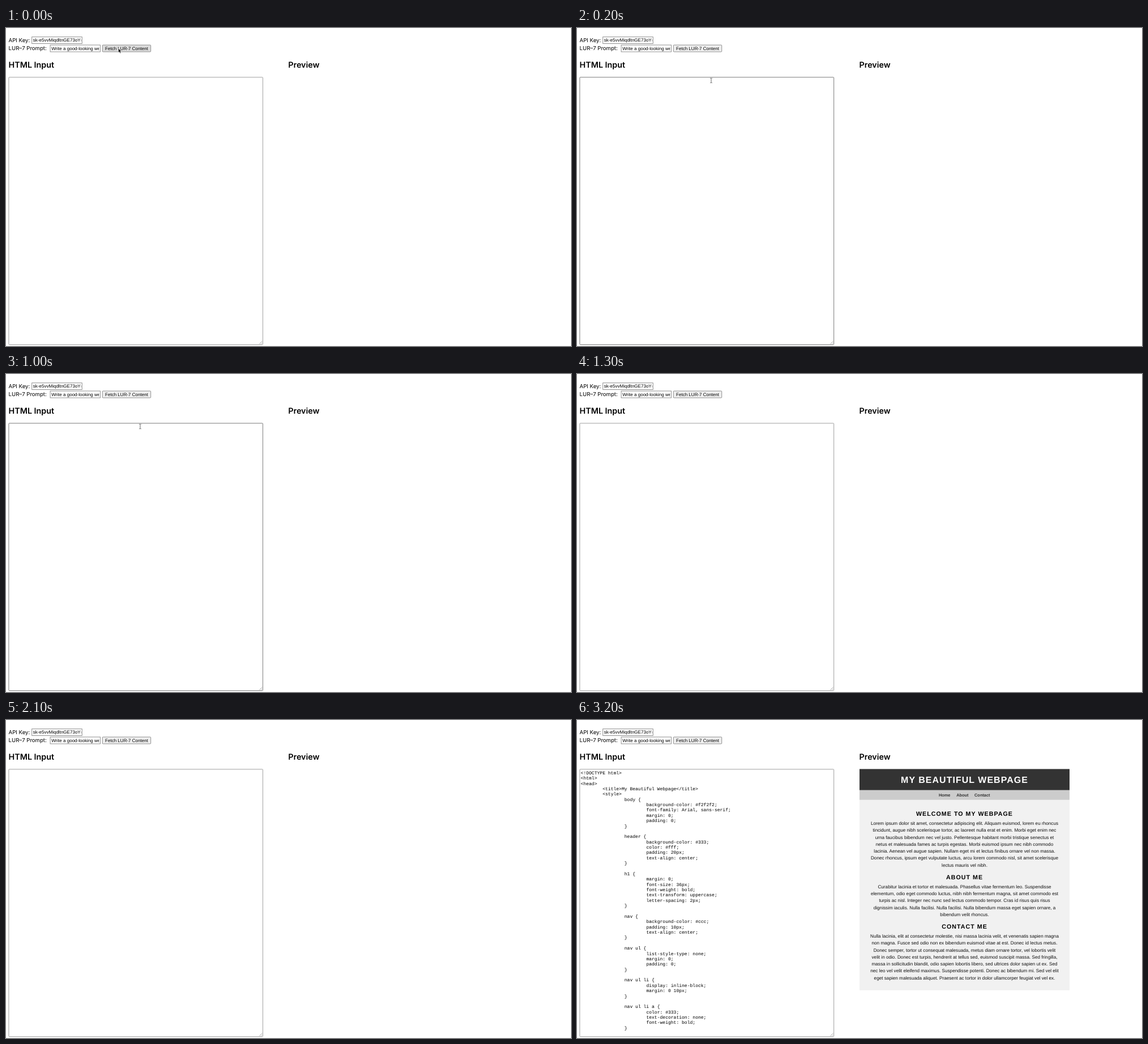
Write an HTML page that moves like this. It is 998 px wide and 561 px high and loops after 6350 ms.

```html
<!DOCTYPE html>
<html lang="en">
<head>
<meta charset="utf-8">
<title>HTML generator demo</title>
<style>
html, body { margin: 0; width: 100%; height: 100%; overflow: hidden; background: #fff; }
svg { display: block; width: 998px; height: 561px; }
text { white-space: pre; text-rendering: geometricPrecision; fill: #000; }
.label { font: 9.6px Inter, "Noto Sans CJK SC", sans-serif; }
.title { font: 600 14.3px Inter, "Noto Sans CJK SC", sans-serif; }
.field { font: 8.04px "Liberation Sans", Arial, sans-serif; }
.code { font: 8.04px "Liberation Mono", "Courier New", monospace; }
.h1, .h2, .nav, .para { font-family: "Liberation Sans", Arial, sans-serif; text-anchor: middle; }
.h1 { font-size: 16px; font-weight: bold; letter-spacing: 1.02px; fill: #fff; }
.h2 { font-size: 10.7px; font-weight: bold; letter-spacing: 1.02px; }
.nav { font-size: 7.4px; font-weight: bold; fill: #333; }
.para { font-size: 8.18px; fill: #111; }
.box { fill: #fff; stroke: #858585; }
</style>
</head>
<body>
<svg viewBox="0 0 998 561">
  <defs>
    <clipPath id="keyClip"><rect x="47" y="16" width="85.5" height="12"/></clipPath>
    <clipPath id="promptClip"><rect x="79" y="30" width="85.5" height="12"/></clipPath>
  </defs>
  <text class="label" x="4.6" y="24.5">API Key:</text>
  <rect class="box" x="45.7" y="15.7" width="88.6" height="11.8" stroke-width=".9"/>
  <g clip-path="url(#keyClip)"><text class="field" x="47.8" y="24.3">sk-e5vvMiqdltnGE73oYc</text></g>
  <text class="label" x="4.6" y="39">LUR–7 Prompt:</text>
  <rect class="box" x="78.1" y="30" width="88.4" height="12" stroke-width=".9"/>
  <g clip-path="url(#promptClip)"><text class="field" x="80.2" y="38.6">Write a good-looking webpage</text></g>
  <rect id="button" class="box" x="170.3" y="30" width="85.4" height="12" rx="1" stroke-width=".9"/>
  <text class="field" x="213" y="38.6" text-anchor="middle">Fetch LUR-7 Content</text>
  <text class="title" x="4.6" y="70">HTML Input</text>
  <text class="title" x="498.6" y="70">Preview</text>
  <rect id="area" class="box" x="4.9" y="86.9" width="448.8" height="471.7" rx="1" stroke-width=".9"/>
  <path d="M447.5 557.5l5-5M450.5 557.5l2-2" stroke="#888" stroke-width=".7"/>
  <g id="result">
    <rect x="499" y="86.5" width="371" height="390.3" fill="#f1f1f1"/>
    <rect x="499" y="86.5" width="371" height="37.3" fill="#333"/>
    <rect x="499" y="123.8" width="371" height="17" fill="#ccc"/>
  </g>
  <path id="arrow" d="M0 0v7.5l1.7-1.5 1.2 2.7 1.4-.6-1.2-2.6h2.3z" stroke="#fff" stroke-width=".6"/>
  <path id="beam" d="M-1.8-4.2q1.5 0 1.8.8 .3-.8 1.8-.8M0-3.4v6.8M-1.8 4.2q1.5 0 1.8-.8 .3.8 1.8.8" fill="none" stroke="#444" stroke-width=".8"/>
</svg>
<script>
const LOOP = 6350;
const $ = id => document.getElementById(id);

function addText(kind, x, y, content) {
  const node = document.createElementNS("http://www.w3.org/2000/svg", "text");
  node.setAttribute("class", kind);
  node.setAttribute("x", x);
  node.setAttribute("y", y);
  node.textContent = content;
  $("result").append(node);
}

// Generated markup: each entry is a [tab depth, line] pair
const rules = [
  ["body", "background-color: #f2f2f2", "font-family: Arial, sans-serif", "margin: 0", "padding: 0"],
  ["header", "background-color: #333", "color: #fff", "padding: 20px", "text-align: center"],
  ["h1", "margin: 0", "font-size: 36px", "font-weight: bold", "text-transform: uppercase", "letter-spacing: 2px"],
  ["nav", "background-color: #ccc", "padding: 10px", "text-align: center"],
  ["nav ul", "list-style-type: none", "margin: 0", "padding: 0"],
  ["nav ul li", "display: inline-block", "margin: 0 10px"],
  ["nav ul li a", "color: #333", "text-decoration: none", "font-weight: bold"]
];
const source = [
  [0, "<!DOCTYPE html>"], [0, "<html>"], [0, "<head>"],
  [1, "<title>My Beautiful Webpage</title>"], [1, "<style>"],
  ...rules.flatMap(([selector, ...body]) => [
    [2, selector + " {"], ...body.map(line => [3, line + ";"]), [2, "}"], [0, ""]
  ])
];
source.forEach(([depth, line], i) => addText("code", 6.6 + depth * 38.6, 95.8 + i * 9.375, line));

// Rendered page
const CENTER = 684.5;
addText("h1", CENTER, 110.8, "MY BEAUTIFUL WEBPAGE");
addText("nav", 649.2, 134.6, "Home");
addText("nav", 680.8, 134.6, "About");
addText("nav", 715.8, 134.6, "Contact");

function addSection(y, heading, body) {
  addText("h2", CENTER, y, heading);
  body.trim().split("\n").forEach((line, i) => addText("para", CENTER, y + 16 + i * 12.25, line.trim()));
}
addSection(169, "WELCOME TO MY WEBPAGE", `
  Lorem ipsum dolor sit amet, consectetur adipiscing elit. Aliquam euismod, lorem eu rhoncus
  tincidunt, augue nibh scelerisque tortor, ac laoreet nulla erat et enim. Morbi eget enim nec
  urna faucibus bibendum nec vel justo. Pellentesque habitant morbi tristique senectus et
  netus et malesuada fames ac turpis egestas. Morbi euismod ipsum nec nibh commodo
  lacinia. Aenean vel augue sapien. Nullam eget mi et lectus finibus ornare vel non massa.
  Donec rhoncus, ipsum eget vulputate luctus, arcu lorem commodo nisl, sit amet scelerisque
  lectus mauris vel nibh.`);
addSection(280.9, "ABOUT ME", `
  Curabitur lacinia et tortor et malesuada. Phasellus vitae fermentum leo. Suspendisse
  elementum, odio eget commodo luctus, nibh nibh fermentum magna, sit amet commodo est
  turpis ac nisl. Integer nec nunc sed lectus commodo tempor. Cras id risus quis risus
  dignissim iaculis. Nulla facilisi. Nulla facilisi. Nulla bibendum massa eget sapien ornare, a
  bibendum velit rhoncus.`);
addSection(368.2, "CONTACT ME", `
  Nulla lacinia, elit at consectetur molestie, nisi massa lacinia velit, et venenatis sapien magna
  non magna. Fusce sed odio non ex bibendum euismod vitae at est. Donec id lectus metus.
  Donec semper, tortor ut consequat malesuada, metus diam ornare tortor, vel lobortis velit
  velit in odio. Donec est turpis, hendrerit at tellus sed, euismod suscipit massa. Sed fringilla,
  massa in sollicitudin blandit, odio sapien lobortis libero, sed ultrices dolor sapien ut ex. Sed
  nec leo vel velit eleifend maximus. Suspendisse potenti. Donec ac bibendum mi. Sed vel elit
  eget sapien malesuada aliquet. Praesent ac tortor in dolor ullamcorper feugiat vel vel ex.`);

// Pointer steps: start time, shape, x, y
const pointer = [
  [0, "arrow", 198.6, 36],
  [100, "arrow", 222, 68],
  [200, "beam", 237, 92.6],
  [1100, "arrow", 238, 60],
  [1200, "arrow", 240, 20],
  [1300, "none", 0, 0]
];

function show(node, on) {
  node.style.visibility = on ? "visible" : "hidden";
}

function draw(now) {
  const t = now % LOOP;
  const [, shape, x, y] = pointer.findLast(step => step[0] <= t);
  for (const name of ["arrow", "beam"]) {
    show($(name), shape === name);
    $(name).setAttribute("transform", `translate(${x} ${y})`);
  }
  $("button").style.fill = t < 100 ? "#dcdcdc" : "#efefef";
  $("area").style.stroke = shape === "beam" ? "#6a6a6a" : "#959595";
  show($("result"), t >= 3100);
}

const start = performance.now();
function tick() {
  draw(performance.now() - start);
  requestAnimationFrame(tick);
}
tick();
</script>
</body>
</html>
```
